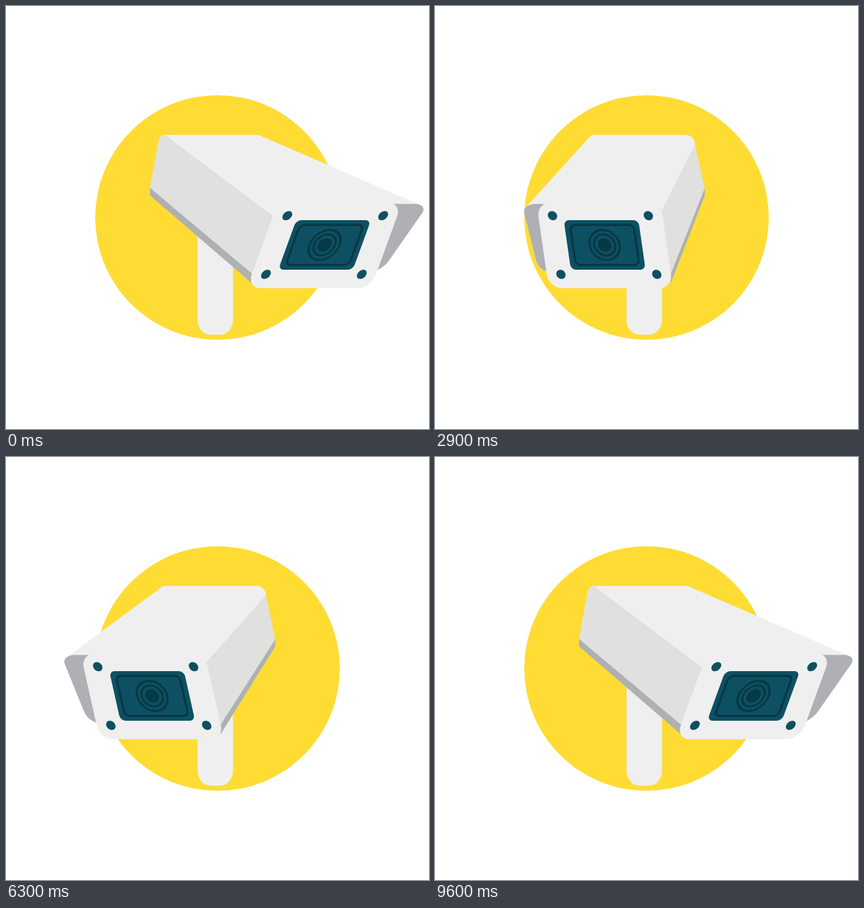
Animation, 640 px wide and 640 px high, one loop 9.7 s. Source, as an HTML page with a canvas:

```html
<!DOCTYPE html>
<html lang="en">
<head>
<meta charset="utf-8">
<title>Security camera</title>
<style>
  html, body { margin: 0; width: 100%; height: 100%; overflow: hidden; background: #fff; }
  canvas { display: block; width: 640px; height: 640px; }
</style>
</head>
<body>
<canvas id="stage" width="640" height="640"></canvas>
<script>
const ctx = document.getElementById('stage').getContext('2d');
const LOOP = 9700, SWEEP = 4775, MAX = 20, MID_Y = 361.5;
const C = {
  sun: '#ffdc34', body: '#efefef', side: '#e0e0de',
  shade: '#afb0b4', panel: '#0e5063', ink: '#073845'
};
const tan = deg => Math.tan(deg * Math.PI / 180);
const clamp = (v, a = 0, b = 1) => Math.min(b, Math.max(a, v));

// cubic-bezier(.5, 0, .5, 1)
function ease(u) {
  let lo = 0, hi = 1;
  for (let i = 0; i < 30; i++) {
    const s = (lo + hi) / 2;
    if (1.5 * s * (1 - s) + s ** 3 < u) lo = s; else hi = s;
  }
  return lo * lo * (3 - 2 * lo);
}

// Turn of the camera in degrees: right, left, right again
function turnAt(ms) {
  const t = ms % LOOP;
  const p = t < SWEEP ? ease(t / SWEEP) : 1 - ease(clamp((t - SWEEP) / SWEEP));
  return MAX - 2 * MAX * p;
}

// Points on a quarter ellipse starting at angle a (in quarter turns)
function corner(cx, cy, rx, ry, a) {
  return Array.from({ length: 13 }, (_, i) => {
    const f = (a + i / 12) * Math.PI / 2;
    return [cx + rx * Math.cos(f), cy + ry * Math.sin(f)];
  });
}

function hull(points) {
  const pts = [...points].sort((a, b) => a[0] - b[0] || a[1] - b[1]);
  const chain = list => {
    const out = [];
    for (const p of list) {
      while (out.length > 1) {
        const [a, b] = out.slice(-2);
        if ((b[0] - a[0]) * (p[1] - a[1]) - (b[1] - a[1]) * (p[0] - a[0]) > 0) break;
        out.pop();
      }
      out.push(p);
    }
    return out.slice(0, -1);
  };
  return [...chain(pts), ...chain(pts.reverse())];
}

function poly(pts, color) {
  ctx.beginPath();
  pts.forEach(p => ctx.lineTo(p[0], p[1]));
  ctx.closePath();
  ctx.fillStyle = color;
  ctx.fill();
}

function box(hw, top, bottom, r, color, line) {
  ctx.beginPath();
  ctx.roundRect(-hw, top, 2 * hw, bottom - top, r);
  paint(color, line);
}

function disc(x, y, r, color, line) {
  ctx.beginPath();
  ctx.arc(x, y, r, 0, 7);
  paint(color, line);
}

function paint(color, line) {
  ctx.fillStyle = ctx.strokeStyle = color;
  if (line) { ctx.lineWidth = line; ctx.stroke(); } else ctx.fill();
}

function hoodShape(turn) {
  const cx = 320 + 8.72 * turn, s = tan(1.75 * turn), hw = 101.8;
  return [
    ...corner(hw - 18, 385, 18, 18, 0),
    ...corner(18 - hw, 385, 18, 18, 1),
    ...corner(21 - hw, 313.5, 21, 14, 2),
    ...corner(hw - 21, 313.5, 21, 14, 3)
  ].map(([x, y]) => [cx + x - s * (y - 361), y]);
}

const back = [...corner(241, 207, 10.5, 12, 2), ...corner(379.5, 210, 14, 15, 3)];

function drawSide(turn, cx) {
  const left = turn > 0, d = left ? -1 : 1, amount = Math.abs(turn);
  const s = tan(turn), hs = tan(1.75 * turn);
  const faceX = y => cx + d * 94 - s * (y - MID_Y);
  const topY = left ? 313 + .25 * turn : 310;
  const hoodX = 320 + 8.72 * turn + d * 101.8 - hs * (topY - 361);
  const topX = left ? Math.min(faceX(topY), hoodX) : Math.max(faceX(topY), hoodX);
  const lowX = faceX(405), lowY = 405 + 15 * clamp(amount / 4.6);
  const backX = left ? 227 - .47 * turn : 409.5 + .18 * turn;
  const lip = clamp(1 - amount / 14);

  poly([[backX, 274], [backX + .3, 286.5], [lowX - d * .5, lowY], [lowX, 404]], C.shade);

  ctx.beginPath();
  if (left) {
    const bx = 229.5 + turn, by = 208 - .3 * turn;
    ctx.moveTo(backX, 275);
    ctx.lineTo(230.5, 207);
    ctx.quadraticCurveTo(232, 196, 241, 195);
    ctx.quadraticCurveTo(bx - 2, 199, bx, by);
  } else {
    ctx.moveTo(backX, 276);
    ctx.lineTo(393.3, 209.5);
  }
  ctx.lineTo(topX, topY);
  ctx.quadraticCurveTo(topX - d * 3 * lip, topY - 9 * lip,
                       topX - d * 19 * lip, topY - 13 * lip);
  ctx.lineTo(faceX(340) - d * 6, 340);
  ctx.lineTo(lowX - d * 2, 405);
  ctx.lineTo(lowX, 405);
  ctx.closePath();
  paint(C.side);
}

function drawFace(turn, cx) {
  ctx.save();
  ctx.transform(1, 0, -tan(turn), 1, cx, MID_Y);
  box(94, -64, 65.5, 21, C.body);
  for (const x of [-72.5, 72.5])
    for (const y of [-44.3, 44.5]) disc(x, y, 7, C.panel);
  box(56.5, -37.5, 37.5, 8, C.panel);
  box(48, -30.2, 30.2, 7, C.ink, 3.4);
  disc(0, 0, 22.8, C.ink, 3.4);
  disc(0, 0, 15.9, C.ink, 3.4);
  disc(0, 0, 10.3, C.ink);
  ctx.restore();
}

function draw(ms) {
  const turn = turnAt(ms), cx = 322 + 8 * turn;
  ctx.fillStyle = '#fff';
  ctx.fillRect(0, 0, 640, 640);
  disc(320, 320, 185, C.sun);
  ctx.beginPath();
  ctx.roundRect(289.7, 300, 53.8, 197.3, [0, 0, { x: 19, y: 23 }, { x: 19, y: 23 }]);
  paint(C.body);

  const hood = hoodShape(turn);
  poly(hull([...back, ...hood]), C.body);
  poly(hood, C.shade);
  if (Math.abs(turn) > 1) drawSide(turn, cx);
  drawFace(turn, cx);
}

const start = performance.now();
function tick() {
  draw(performance.now() - start);
  requestAnimationFrame(tick);
}
tick();
</script>
</body>
</html>
```
